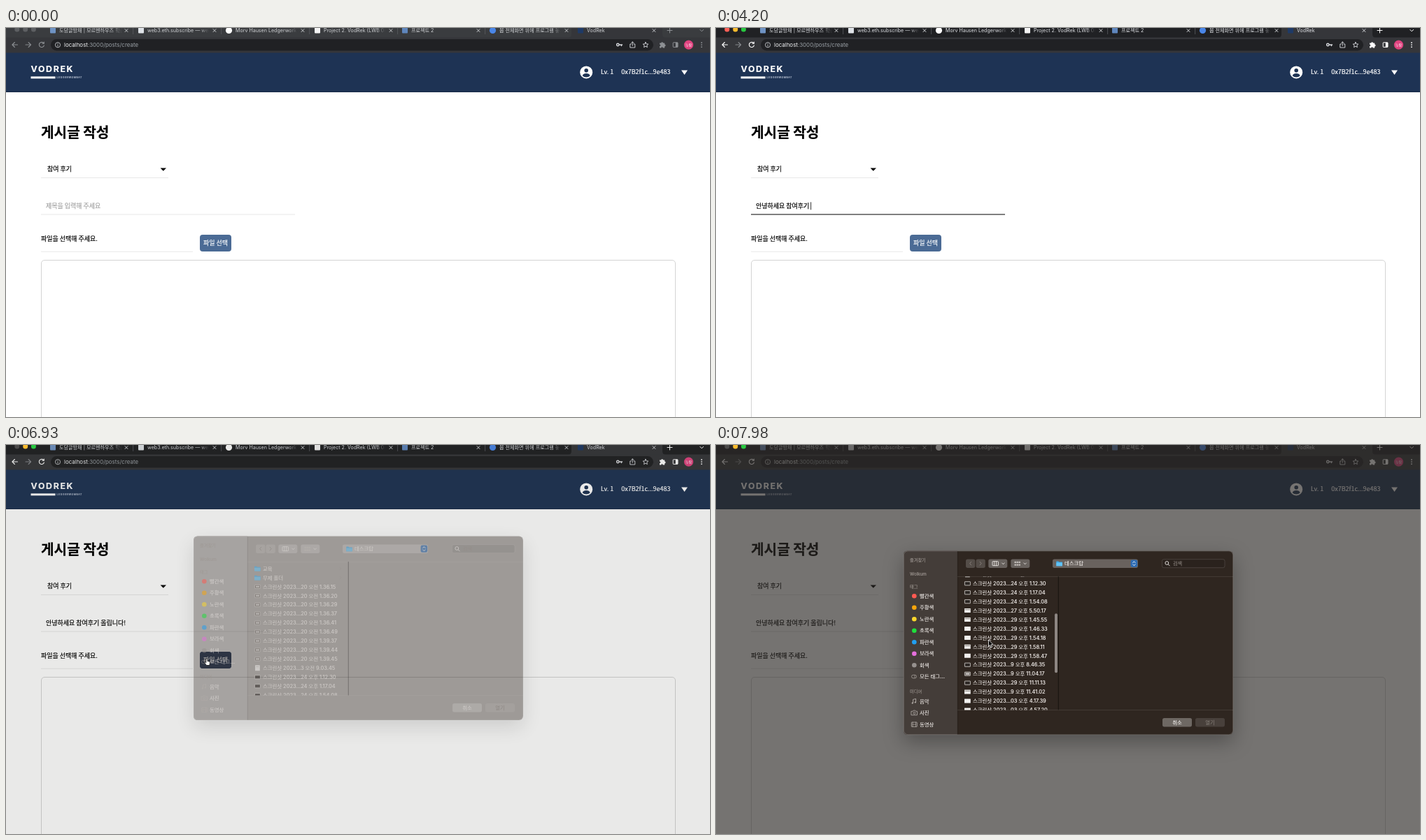
Write an HTML page that moves like this. It is 1006 px wide and 557 px high and loops after 8 s.

```html
<!DOCTYPE html>
<html>
<head>
<meta charset="utf-8">
<title>게시글 작성</title>
<style>
html, body { margin: 0; width: 100%; height: 100%; overflow: hidden; background: #fff; }
svg { display: block; width: 1006px; height: 557px; --strip: #202124; --icon: #fff; --title: #dfe1e5; }
svg.off { --strip: #3a3c3f; --icon: #8d9094; --title: #d0d2d5; }
text { white-space: pre; stroke-width: 0; font-family: Inter, "Noto Sans CJK KR", "Noto Sans CJK", sans-serif; }
.page text { font-family: "Noto Sans CJK KR", "Noto Sans CJK", sans-serif; font-weight: 500; stroke-width: .2px; }
.line { fill: none; stroke-linecap: round; stroke-linejoin: round; }
#pane { filter: drop-shadow(0 10px 14px rgba(0,0,0,.3)); }
#face text { font-weight: 500; stroke-width: .12px; }
</style>
</head>
<body>
<svg id="stage" viewBox="0 0 1006 557"></svg>
<script>
const LOOP = 8000, STEP = 70;
const stage = document.getElementById('stage');

// ---- drawing helpers
const text = (x, y, s, size, fill, more = '') =>
  `<text x="${x}" y="${y}" font-size="${size}" fill="${fill}" stroke="${fill}" ${more}>${s}</text>`;
const rect = (x, y, w, h, fill, r = 0, more = '') =>
  `<rect x="${x}" y="${y}" width="${w}" height="${h}" rx="${r}" fill="${fill}" ${more}/>`;
const dot = (x, y, r, fill, more = '') =>
  `<circle cx="${x}" cy="${y}" r="${r}" fill="${fill}" ${more}/>`;
const line = (d, stroke, w = 1, more = '') =>
  `<path class="line" d="${d}" stroke="${stroke}" stroke-width="${w}" ${more}/>`;
const shape = (d, fill, more = '') => `<path d="${d}" fill="${fill}" ${more}/>`;
const icon = (d, w = 1.1) => line(d, 'var(--icon)', w);
const MID = 'text-anchor="middle"';

// ---- browser frame
const TABS = [
  [76, '도담글방채 | 모르벤하우즈 학습', 166, '#6f93c4', 0],
  [202, 'web3.eth.subscribe — web3', 290, '#dfe3e8', 0],
  [328, 'Morv Hausen Ledgerwork Boot', 416, '#fff', 1],
  [454, 'Project 2. VodRek (LWB 08)', 542, '#f4f4f4', 0],
  [579, '프로젝트 2', 667, '#5f86bd', 0],
  [705, '뭅 전체화면 위에 프로그램 놓기', 793, '#4a86e8', 1],
  [830, 'VodRek', 918, '#1f3a66', 0]
];

function tab([x, title, end, color, round], i) {
  const c = x + 96;
  return `<linearGradient id="fade${i}" gradientUnits="userSpaceOnUse" x1="${end - 13}" x2="${end}" y1="0" y2="0">
    <stop offset="0" style="stop-color:var(--title)"/><stop offset="1" style="stop-color:var(--title);stop-opacity:0"/></linearGradient>` +
    (round ? dot(x - 9.5, 3.5, 4.6, color) : rect(x - 13, -.5, 8, 8, color, 1)) +
    text(x, 6.1, title, 7.1, `url(#fade${i})`) +
    line(`M${c - 2} 1.6l4 4m0-4l-4 4`, 'var(--title)', .9) +
    (i < 5 ? rect(c + 9.3, 0, .8, 9, '#5a5d61') : '');
}

function browser() {
  return rect(0, 0, 1006, 14, 'var(--strip)') +
    shape('M803 14Q808 14 808 9V0H938V9Q938 14 943 14Z', '#35363a') +
    TABS.map(tab).join('') +
    icon('M945 3.5h7M948.5 0v7', 1) + icon('M991.8 2.4l2.4 2.4l2.4-2.4', 1) +
    rect(0, 13.5, 1006, 22.5, '#35363a') +
    icon('M16.5 24H9M12.4 20.5L8.9 24l3.5 3.5') +
    line('M28 24h7.5M32.1 20.5l3.5 3.5l-3.5 3.5', '#85888c', 1.1) +
    icon('M53.7 21.6A3.6 3.6 0 1 0 54.4 25M54.3 20v2.3h-2.4') +
    rect(64, 16, 861, 16.5, '#202124', 8.2) +
    dot(74, 24.2, 3.6, 'none', 'stroke="#c4c7cb" stroke-width=".9"') +
    line('M74 24v2M74 22.3v.1', '#c4c7cb', .9) +
    text(83, 27, 'localhost<tspan fill="#9aa0a6">:3000/posts/create</tspan>', 7.95, '#f1f3f4') +
    dot(874.3, 24, 1.7, 'none', 'stroke="#dadce0" stroke-width="1.4"') +
    line('M876.5 24h4M879.4 24v1.6', '#dadce0', 1.4) +
    line('M893.4 23h-1.6v5h7v-5h-1.6M895.3 25.3v-5.3M893.6 21.5l1.7-1.7l1.7 1.7', '#dadce0', .9) +
    line('M914 20.3l1.1 2.5l2.7.3l-2 1.8l.6 2.7l-2.4-1.4l-2.4 1.4l.6-2.7l-2-1.8l2.7-.3Z', '#dadce0', .9) +
    shape('M934 21.6h2.2a1.4 1.4 0 0 1 2.8 0h2.2v2a1.4 1.4 0 0 1 0 2.8v2h-2.5a1.2 1.2 0 0 0-2.4 0H934v-2.3a1.3 1.3 0 0 0 0-2.6Z', 'var(--icon)') +
    rect(953.2, 20.8, 6.8, 6.6, 'none', .6, 'stroke="var(--icon)" stroke-width="1"') +
    rect(956.8, 20.8, 3.2, 6.6, 'var(--icon)') +
    dot(975.5, 24.2, 6.6, '#e0437f') + text(975.5, 26.1, '누람', 5, '#fff', MID) +
    [21, 24.1, 27.2].map(y => dot(994, y, .9, 'var(--icon)')).join('');
}

// ---- page
function page() {
  const rule = (y, w) => rect(50, y, w, 1, '#e8e8e8');
  return `<g class="page">` +
    rect(0, 35.5, 1006, 56.5, '#1e3354') + rect(0, 91, 1006, 1, '#182a47') +
    text(35.5, 63.2, 'VODREK', 12.3, '#fff', 'style="font-family:Inter,sans-serif;font-weight:700;letter-spacing:1.7px"') +
    rect(35.5, 69.4, 35, 3, '#fff') +
    text(72.5, 72.3, 'LEDGERWOMBAT', 3.5, '#a3aec0', 'style="font-family:Inter,sans-serif;letter-spacing:.55px"') +
    dot(829.2, 63.4, 9, '#fff') + dot(829.2, 60.7, 2.8, '#1e3354') +
    shape('M823.7 68.2Q825 65 829.2 65T834.7 68.2Q832.7 70.6 829.2 70.6T823.7 68.2Z', '#1e3354') +
    text(850, 66.3, 'Lv. 1', 8.98, '#fff') + text(879.3, 66.3, '0x7B2f1c...9e483', 8.98, '#fff') +
    shape('M965 60.6H974L969.5 67Z', '#fff') +
    text(50, 156.6, '게시글 작성', 20.2, '#000', 'style="font-weight:700"') +
    text(59, 205.2, '참여 후기', 8.98, '#000') + shape('M220.6 200.4H229L224.8 204.8Z', '#000') +
    rule(214, 182) + rule(266.5, 363) +
    rect(50, 266.4, 363, 1.1, '#222', 0, 'id="focus"') +
    text(57, 257.5, '제목을 입력해 주세요', 8.98, '#a3a3a3', 'id="hint"') +
    text(57, 257.5, '<tspan></tspan><tspan></tspan>', 8.98, '#000', 'id="typed"') +
    rect(0, 259.6, 8, 1, '#000', 0, 'id="compose"') + rect(0, 249.3, .8, 11, '#000', 0, 'id="caret"') +
    text(50, 305, '파일을 선택해 주세요.', 8.98, '#000') + rule(319.7, 217) +
    rect(277, 296, 45, 24, '#4b6b95', 4) + rect(277, 296, 45, 24, '#1e3050', 4, 'id="hover"') +
    text(299.5, 310.6, '파일 선택', 8.98, '#fff', MID) +
    rect(50.5, 332.5, 906, 260, '#fff', 4.5, 'stroke="#d4d4d4"') + `</g>`;
}

// ---- file dialog
const ROW = 12.94;
const FILES = [
  'dir|교육', 'dir|무제 폴더',
  ...'36.15 36.20 36.29 36.37 36.41 36.49 39.37 39.44 39.45'.split(' ').map(s => 'list|20 오전 1.' + s),
  'doc|3 오전 9.03.45', 'dark|24 오후 1.12.30', 'dark|24 오후 1.17.04', 'dark|24 오후 1.54.08',
  'bar|27 오후 5.50.17', 'bar|29 오후 1.45.55', 'white|29 오후 1.46.33', 'white|29 오후 1.54.18',
  'bar|29 오후 1.58.11', 'white|29 오후 1.58.47', 'dark|9 오후 8.46.35', 'list|9 오후 11.04.17',
  'dark|29 오후 11.11.13', 'bar|9 오후 11.41.02', 'white|03 오후 4.17.39', 'white|03 오후 4.57.20'
];
const folder = (x, y) => shape(`M${x} ${y - 3.3}h3l1 1h4.5v5.8h-8.5Z`, '#3da9ea') + rect(x, y - 1.3, 8.5, 4.8, '#62c3f6', .5);
const THUMB = {
  list: y => rect(355.4, y - 2.6, 8, 5.2, '#6d6763', .3, 'stroke="#cfcac6" stroke-width=".8"') + rect(357, y - 1.2, 5, 2.4, '#c9c5c2'),
  dark: y => rect(355.4, y - 2.6, 8, 5.2, '#2c2724', .3, 'stroke="#dcd8d5" stroke-width=".8"'),
  white: y => rect(355, y - 3, 8.8, 6, '#f3f1ef', .3),
  bar: y => rect(355, y - 3, 8.8, 6, '#f3f1ef', .3) + rect(355.4, y - 1.8, 8, .9, '#77716d'),
  doc: y => rect(356, y - 4, 6.8, 8, '#f3f1ef', .3) + rect(357.2, y - 2, 4, .6, '#b9b5b2')
};

function file(entry, i) {
  const [kind, name] = entry.split('|'), y = 198 + i * ROW, dir = kind === 'dir';
  return (dir ? folder(355, y) + line(`M477.2 ${y - 1.8}l1.8 1.8l-1.8 1.8`, '#98918d', .8) : THUMB[kind](y)) +
    text(367, y + 2.7, dir ? name : '스크린샷 2023…' + name, 7.38, '#f0ece9');
}

function dialog() {
  const ink = '#f0ece9', soft = '#9a938e', glyph = '#b5afab';
  const glass = a => `rgba(255,255,255,${a})`;
  const tags = ['빨간색 #ff5a52', '주황색 #f7a50c', '노란색 #fbd72c', '초록색 #1fdf3c', '파란색 #219ff0', '보라색 #e56fdc', '회색 #96918e'];
  const head = (y, s) => text(277, y + 2.3, s, 6.2, soft);
  const item = (y, s) => text(291, y + 2.7, s, 7.4, ink);
  const down = x => line(`M${x} 169l1.7 1.7l1.7-1.7`, ink, .9);
  const button = (x, y, w, a) => rect(x, y, w, 12.4, glass(a), 2.6);
  return `<clipPath id="listBox"><rect x="346" y="188.5" width="143" height="191"/></clipPath><g id="sheet"><g id="pane">` +
    rect(268, 151.5, 471, 263.5, '#2f2620', 6) +
    shape('M345 151.5H274Q268 151.5 268 157.5V409Q268 415 274 415H345Z', '#443d39') +
    `</g><g id="face">` +
    head(165, '즐겨찾기') + head(184.3, 'Wolkum') + head(202.3, '태그') +
    tags.map((s, i) => {
      const [name, color] = s.split(' '), y = 216.2 + i * 16.5;
      return dot(283.3, y, 3.3, color) + item(y, name);
    }).join('') +
    rect(279.5, 329.3, 7, 4.6, 'none', 2.3, `stroke="${soft}" stroke-width=".9"`) + line('M284 329.5v4', soft, .8) + item(331.5, '모든 태그…') +
    head(353, '미디어') +
    line('M281.6 369.4v-5l4-1v5', glyph, .9) + dot(280.7, 369.6, 1.1, glyph) + dot(284.7, 368.5, 1.1, glyph) + item(367, '음악') +
    line('M279.3 381.3h2l.8-1.2h2.6l.8 1.2h2v5.4h-8.2Z', glyph, .8) + dot(283.4, 383.8, 1.5, 'none', `stroke="${glyph}" stroke-width=".8"`) + item(383.5, '사진') +
    rect(279.3, 397, 8, 6.4, 'none', .6, `stroke="${glyph}" stroke-width=".8"`) + line('M281 397v6.4M285.6 397v6.4M281 400.2h4.6', glyph, .7) + item(400, '동영상') +
    button(357, 163.5, 13.3, .18) + button(371.5, 163.5, 13.3, .18) +
    line('M364.7 167.2l-2 2.4l2 2.4', '#8b837e', .9) + line('M377.1 167.2l2 2.4l-2 2.4', '#8b837e', .9) +
    button(389.3, 163.5, 27, .28) + rect(395, 166.7, 8.4, 6, 'none', .6, `stroke="${ink}" stroke-width=".9"`) +
    line('M397.8 166.7v6M400.6 166.7v6', ink, .8) + down(408.7) +
    button(421.3, 163.5, 27, .28) +
    [0, 3, 6].map(d => [0, 3.6].map(e => rect(426.5 + d, 166.8 + e, 2.4, 2.3, '#c4bfbb', .3)).join('')).join('') + down(439.9) +
    button(481, 163.5, 122, .28) + folder(486.3, 169.7) + text(498, 172.3, '데스크탑', 7.3, ink) +
    rect(592.6, 164.5, 9.6, 10.3, '#2d6cb4', 2.2) + line('M595.7 168.5l1.7-1.8l1.7 1.8M595.7 170.9l1.7 1.8l1.7-1.8', '#fff', .9) +
    rect(637.4, 163.7, 89.6, 12, 'rgba(0,0,0,.1)', 2.5, `stroke="${glass(.16)}" stroke-width=".8"`) +
    dot(644.3, 169, 2.4, 'none', `stroke="${ink}" stroke-width=".9"`) + line('M646.2 170.9l2 2', ink, .9) + text(653, 172.2, '검색', 7.2, '#8b847f') +
    rect(345, 188, 394, .7, glass(.13)) + rect(345, 379.3, 394, .7, glass(.13)) +
    rect(488.8, 188, .8, 191.5, 'rgba(0,0,0,.65)') + rect(344.8, 152, .6, 263, 'rgba(0,0,0,.3)') +
    `<g clip-path="url(#listBox)"><g id="files">${FILES.map(file).join('')}</g>` +
    rect(484, 188, 4, 85, '#8d8682', 2, 'id="thumb"') + `</g>` +
    button(638, 391, 42, .3) + text(659, 399.8, '취소', 7.3, '#f3f0ee', MID) +
    button(685, 391, 42, .12) + text(706, 399.8, '열기', 7.3, '#847c77', MID) +
    rect(268.3, 151.8, 470.4, 262.9, 'none', 6, `stroke="${glass(.3)}" stroke-width=".7"`) + `</g></g>`;
}

const POINTERS = {
  arrow: shape('M0 0V9.3L2.1 7.4L3.6 10.8L5.2 10.1L3.7 6.8H6.6Z', '#000', 'stroke="#fff" stroke-width=".8"'),
  beam: line('M-1.7-5Q0-5 0-4V4Q0 5-1.7 5M1.7-5Q0-5 0-4M0 4Q0 5 1.7 5', '#222', .9),
  hand: shape('M-1.2-3.6Q0-4.8 .9-3.5V-.6L3.6 0Q4.8.5 4.5 2L3.8 5.5H-.5L-3.3 1.8Q-3.4.5-2.2.8L-1.2 1.6Z', '#fff', 'stroke="#111" stroke-width=".8"')
};

stage.innerHTML = browser() + page() +
  rect(0, 0, 1006, 557, '#2b2825', 0, 'id="dim"') +
  [15.8, 27.7, 39.4].map(x => dot(x, 2, 3.5, '#fff', 'class="light"')).join('') +
  dialog() +
  Object.entries(POINTERS).map(([k, s]) => `<g class="pointer" data-kind="${k}">${s}</g>`).join('');

// ---- timing
const $ = id => document.getElementById(id);
const lights = [...document.querySelectorAll('.light')];
const pointers = [...document.querySelectorAll('.pointer')];
const [done, pending] = $('typed').children;

// time, finished text, syllable being composed
const TYPING = [
  [1260, '', 'ㅇ'], [1330, '', '아'], [1540, '', '안'], [1750, '안', 'ㄴ'], [1820, '안', '녀'], [1890, '안', '녕'],
  [2100, '안녕', 'ㅎ'], [2170, '안녕', '하'], [2450, '안녕하', 'ㅅ'], [2520, '안녕하', '세'],
  [2730, '안녕하세', '요'], [2800, '안녕하세요 ', ''],
  ...[[3010, '', 'ㅊ'], [3080, '', '차'], [3150, '', '참'], [3220, '참', 'ㅇ'], [3360, '참', '여'], [3500, '참', '옇'],
    [3640, '참여', '후'], [4060, '참여', '훅'], [4130, '참여후', '기'], [4200, '참여후기 ', ''],
    [4340, '참여후기 ', 'ㅇ'], [4410, '참여후기 ', '오'], [4480, '참여후기 ', '올'], [4620, '참여후기 올', 'ㄹ'],
    [4760, '참여후기 올', '리'], [5110, '참여후기 올', '립'], [5320, '참여후기 올립', 'ㄴ'], [5390, '참여후기 올립', '니'],
    [5460, '참여후기 올립', '닏'], [5530, '참여후기 올립니', '다'], [5880, '참여후기 올립니다!', '']
  ].map(([t, a, b]) => [t, '안녕하세요 ' + a, b])
];
const PATH = [
  [0, 970, 508, ''], [70, 970, 508, 'arrow'], [140, 600, 395, 'arrow'], [210, 242, 306, 'arrow'], [420, 242, 306, 'arrow'],
  [630, 205, 266, 'beam'], [840, 184, 255, 'beam'], [1260, 184, 255, ''],
  [6090, 184, 255, 'beam'], [6300, 215, 268, 'arrow'], [6580, 281, 303, 'hand'], [6790, 287, 310, 'hand'],
  [7000, 287, 310, 'hand'], [7070, 289, 306, 'arrow'], [7140, 294.6, 300.5, 'arrow'], [7280, 389.5, 279, 'arrow']
];
const DIM = [[6860, 0], [6930, .1], [7000, .255], [7070, .47], [7140, .65]];
const SHEET = [[6860, 0, -25], [6930, .4, -21], [7000, .76, -12.5], [7070, .94, -4], [7140, 1, 0]];
const SCROLL = [[7490, 0], [7560, 10], [7630, 40], [7700, 78], [7770, 112], [7840, 140], [7910, 140], [7980, 155]];

const last = (table, t) => table.reduce((hit, row) => row[0] <= t ? row : hit, null);
const ramp = (t, from, span) => Math.min(1, Math.max(0, (t - from) / span));
function tween(table, t, col = 1) {
  const i = table.findIndex(row => row[0] > t);
  if (i === 0) return table[0][col];
  if (i < 0) return table[table.length - 1][col];
  const a = table[i - 1], b = table[i];
  return a[col] + (b[col] - a[col]) * (t - a[0]) / (b[0] - a[0]);
}
const set = (el, attrs) => { for (const k in attrs) el.setAttribute(k, attrs[k]); };

function render(time) {
  const t = Math.floor((time % LOOP) / STEP) * STEP;
  const active = t >= 840, open = t >= 6930;
  stage.classList.toggle('off', !active);
  ['#ff5f57', '#febc2e', '#28c840'].forEach((c, i) =>
    set(lights[i], { fill: !active ? '#5d5f62' : open && !i ? '#4b4a49' : c }));

  const [, a, b] = last(TYPING, t) || [0, '', ''];
  done.textContent = a;
  pending.textContent = b;
  const start = 57 + (a ? done.getComputedTextLength() : 0);
  const width = b ? pending.getComputedTextLength() : 0;
  set($('hint'), { opacity: a || b ? 0 : 1 });
  set($('compose'), { x: start, width });
  set($('caret'), { x: start + width, opacity: active && t < 6720 ? 1 : 0 });
  set($('focus'), { opacity: ramp(t, 840, 200) - ramp(t, 6720, 200) });
  set($('hover'), { opacity: ramp(t, 6510, 200) });

  const shown = tween(SHEET, t);
  set($('dim'), { opacity: tween(DIM, t) });
  set($('sheet'), { transform: `translate(0 ${tween(SHEET, t, 2)})` });
  set($('pane'), { opacity: shown });
  set($('face'), { opacity: Math.min(1, shown * 1.3) });
  const y = tween(SCROLL, t);
  set($('files'), { transform: `translate(0 ${-y})` });
  set($('thumb'), { y: 188.5 + y * .34, opacity: y ? 1 : 0 });

  const kind = last(PATH, t)[3];
  const place = `translate(${tween(PATH, t)} ${tween(PATH, t, 2)})`;
  pointers.forEach(p => set(p, { transform: place, opacity: p.dataset.kind === kind ? 1 : 0 }));
}

const begin = performance.now();
function tick() {
  render(performance.now() - begin);
  requestAnimationFrame(tick);
}
tick();
</script>
</body>
</html>
```
